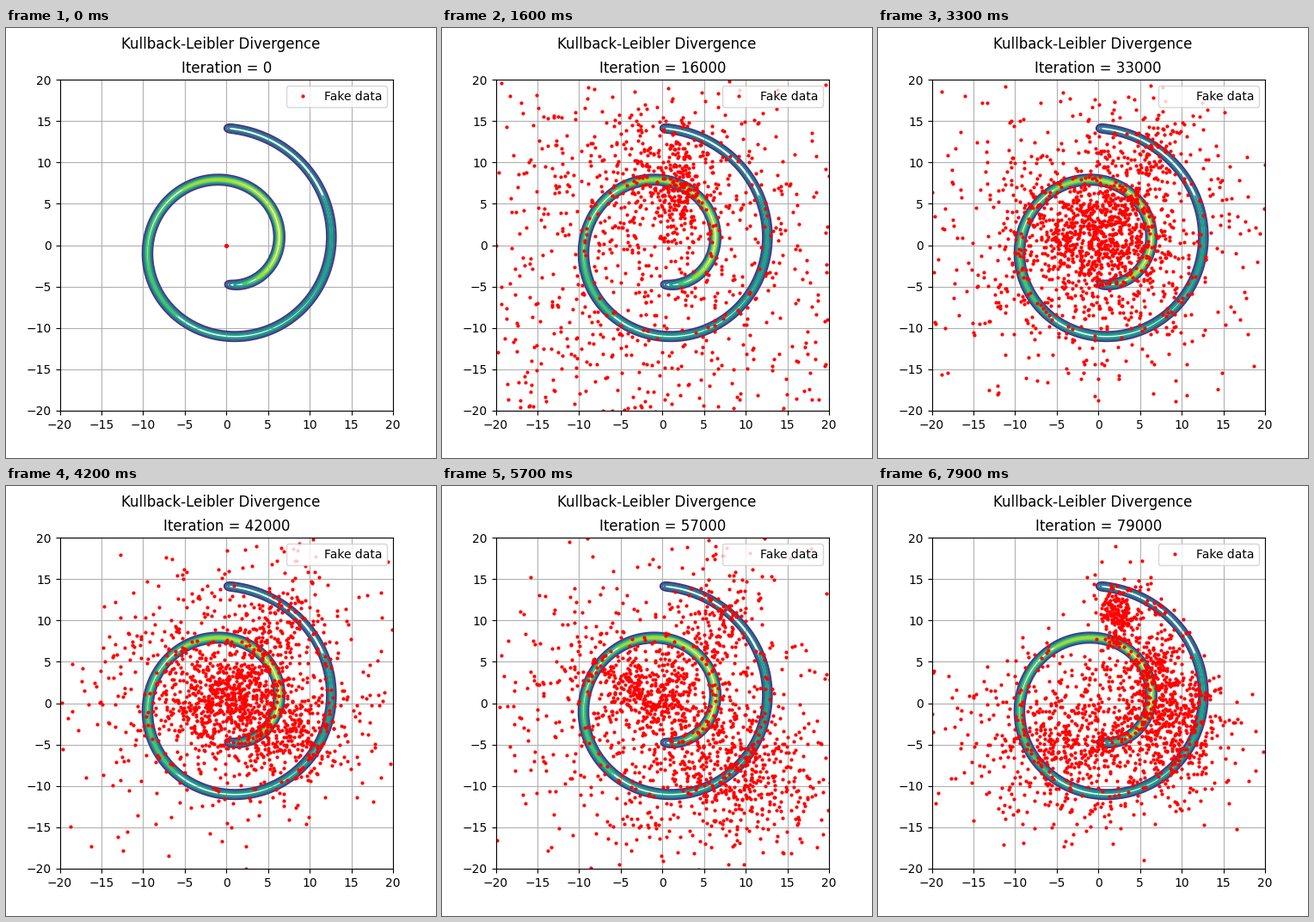
Recreate the animation shown at these times as a matplotlib script. Size 500 by 500 pixels, loop 8 s.

```python
import numpy as np
import matplotlib.pyplot as plt
from matplotlib.animation import FuncAnimation

plt.rcParams["font.family"] = "DejaVu Sans"

FRAMES, STEP, LIM = 80, 1000, 20
COUNT = 1650
WEIGHTS = [0.09, 0.20, 0.25, 0.46]

# Generator output as a four-part Gaussian mixture that drifts between keys.
# Each part: mean x, mean y, sd x, sd y, correlation
KEY_TIMES = [16, 25, 42, 57, 65, 79]
KEYS = np.array([
    [[2, 6.5, 1.1, 3, .3], [0, 7, 6, 5, 0],
     [-10, -11, 16, 12, 0], [2, -4, 19, 19, 0]],
    [[4.5, 8, 2.6, 4, .92], [0, 1.5, 3.5, 3.5, 0],
     [-5, 3, 8, 8, 0], [0, 1, 8.5, 9, 0]],
    [[5.5, 8, 2.8, 4.5, .7], [-1, 1, 3, 2.5, 0],
     [6, -3, 4.5, 3, -.2], [0, 2, 9, 8, 0]],
    [[6.5, 9, 2.4, 4.5, .4], [-2, 1.5, 4.2, 2.6, -.6],
     [9, -8.5, 5, 4.5, -.4], [0, -1, 9.5, 9, 0]],
    [[2.6, 12.5, 1, 4, .1], [4, 5, 5, 4, -.2],
     [10, -3, 4.2, 5, -.3], [1, -5, 6.5, 6.5, 0]],
    [[2.2, 10.8, .9, 1.7, -.2], [6.5, 5, 3.2, 5, -.6],
     [8, -2.5, 4, 4.5, -.2], [-3, -4.5, 6.5, 5, 0]],
])


def spiral_density(grid, sigma=0.32):
    """Blurred swiss roll r = t, fading in at its inner end."""
    t = np.linspace(1.5 * np.pi, 4.5 * np.pi, 1500)
    x, y = t * np.cos(t), t * np.sin(t)
    crest = 52.2 / t * (1 - np.exp(-(t - 4.4) / 1.05))
    arc = np.hypot(1, t) * (t[1] - t[0])
    weight = crest * arc / (sigma * np.sqrt(2 * np.pi))
    gx = np.exp(-((grid[:, None] - x) / sigma) ** 2 / 2)
    gy = np.exp(-((grid[:, None] - y) / sigma) ** 2 / 2)
    return (gy * weight) @ gx.T


def mixture(n):
    i = int(np.clip(np.searchsorted(KEY_TIMES, n) - 1, 0, len(KEYS) - 2))
    a, b = KEY_TIMES[i], KEY_TIMES[i + 1]
    u = np.clip((n - a) / (b - a), 0, 1)
    return KEYS[i] * (1 - u) + KEYS[i + 1] * u


def samples(n):
    rng = np.random.default_rng(n + 1)
    part = rng.choice(len(WEIGHTS), COUNT, p=WEIGHTS)
    mx, my, sx, sy, rho = mixture(n)[part].T
    p, q = rng.standard_normal((2, COUNT))
    q = rho * p + np.sqrt(1 - rho ** 2) * q
    spread = 1 - np.exp(-n / 3) if n < KEY_TIMES[0] else 1
    return spread * (mx + sx * p), spread * (my + sy * q)


fig, ax = plt.subplots(figsize=(5, 5), dpi=100)
fig.suptitle("Kullback-Leibler Divergence", fontsize=12)
title = ax.set_title("Iteration = 0", fontsize=12)
ticks = np.arange(-LIM, LIM + 1, 5)
ax.set(xlim=(-LIM, LIM), ylim=(-LIM, LIM), xticks=ticks, yticks=ticks)
ax.grid(True)

grid = np.linspace(-LIM, LIM, 500)
ax.contour(grid, grid, spiral_density(grid), levels=range(1, 7),
           cmap="viridis", vmin=0, vmax=7)
dots, = ax.plot([], [], "r.", markersize=4, label="Fake data")
legend = ax.legend(loc="upper right")
key_dot = legend.legend_handles[0]


def update(n):
    dots.set_data(*samples(n))
    title.set_text(f"Iteration = {n * STEP}")
    key_dot.set_visible(not 20 <= n < 61)
    return dots, title, key_dot


anim = FuncAnimation(fig, update, frames=FRAMES, interval=100,
                     repeat=True, repeat_delay=0, blit=False)
plt.show()
```
